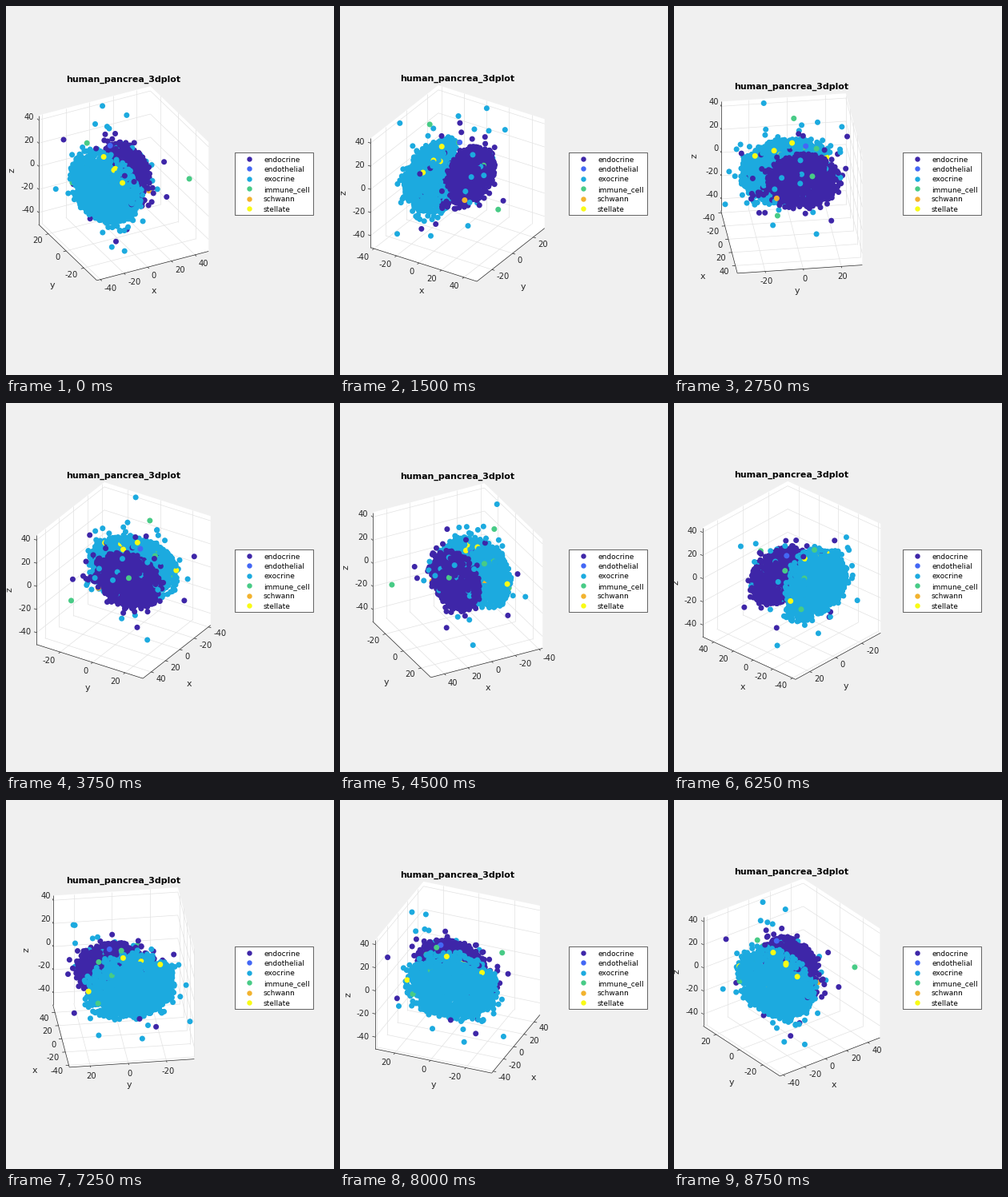
Write a matplotlib script that moves like this. It is 410 px wide and 461 px high and loops after 9000 ms.

```python
import numpy as np
import matplotlib.pyplot as plt
from matplotlib.animation import FuncAnimation
from matplotlib.collections import LineCollection
from matplotlib.colors import to_rgba

W, H, DPI = 410, 461, 100
STEPS, STEP_MS = 36, 250
PX = 72 / DPI                       # points per pixel
CX, CY, R = 147, 221.5, 78.75       # box centre and half edge in pixels
SIN_EL, COS_EL = 0.5, np.sqrt(0.75)
INK = "#262626"

KINDS = [("endocrine", "#3e26a8"), ("endothelial", "#4367f5"),
         ("exocrine", "#1caadf"), ("immune_cell", "#48cb86"),
         ("schwann", "#f2b22e"), ("stellate", "#f9fb15")]
LIMITS = [(-43, 51.5), (-34.6, 31), (-50.3, 44.1)]
TICKS = [range(-40, 41, 20), range(-20, 21, 20), range(-40, 41, 20)]

# Isolated cells, in box pixels from the centre.
STRAYS = {
    0: [(-45, 76, 36), (-17, -61, 38), (39, 45, -35), (-30, -37, -57),
        (-12, -32, -47), (-4, 15, 65), (-32, 13, 52), (56, -2, 17),
        (-36, 67, -26), (32, -55, 0), (-18, -56, 3), (-54, -13, -30)],
    1: [(-9, 19, 47)],
    2: [(3, 63, 78.5), (34, 57, 60), (-69, -26, 78), (-50, -26, 51),
        (-21.5, 35.6, 73), (8, 60, 49), (0, 39, 59), (-48, 19, 55),
        (-39.5, -78.5, -47), (-27, -20, -74.5), (-5, 32, -78.5),
        (-69, 51, -16)],
    3: [(78, -28, 0), (-47, 9, 66), (24, 23, 22), (-20, 34, 36),
        (-40, 20, 27), (-52, 39, -5)],
    4: [(24.5, -22, -6), (-34, 9, -7)],
    5: [(-26, 4, 43), (-23.5, -19, 35), (-24, -43, 29), (-18, -12, 32),
        (-44, 50, 8.5)],
}

rng = np.random.default_rng(7)


def blob(n, center, half, halo=0.1):
    """Filled ellipsoid with a thin halo of scattered points."""
    v = rng.normal(size=(n, 3))
    v /= np.linalg.norm(v, axis=1)[:, None]
    r = np.cbrt(rng.random(n))
    r *= np.where(rng.random(n) < halo, rng.uniform(1, 1.35, n), 1)
    return np.array(center) + v * r[:, None] * np.array(half)


def seam(pts):
    """Signed distance from the slanted border between both big clusters."""
    return pts[:, 0] + 14 + 0.4 * pts[:, 1] + rng.normal(0, 3.5, len(pts))


def make_cells():
    endo = np.vstack([blob(950, (10, 14, 9), (24, 46, 37)),
                      blob(130, (8, 0, 5), (24, 62, 36))])
    endo = np.vstack([endo[seam(endo) > 0],
                      blob(8, (-25, 0, 4), (38, 60, 42))])
    exo = blob(1900, (-25, 0, 3), (39, 64, 43))
    exo = np.vstack([exo[seam(exo) < 0],
                     blob(24, (10, 10, 9), (26, 52, 40), 0.3)])
    groups = {0: endo, 2: exo}
    pts, kind = [], []
    for k in range(len(KINDS)):
        g = np.array(STRAYS[k], float)
        if k in groups:
            g = np.vstack([groups[k], g])
        pts.append(g)
        kind += [k] * len(g)
    return np.vstack(pts), np.array(kind)


cells, kind = make_cells()
cell_rgba = np.array([to_rgba(c) for _, c in KINDS])[kind]
rare = np.where((kind == 0) | (kind == 2), 0, 10)


def turn(pts, c, s):
    """Rotate and flatten box vectors to screen vectors (y down)."""
    p = np.asarray(pts, float)
    x, y, z = p[..., 0], p[..., 1], p[..., 2]
    return np.stack([x * c + y * s,
                     (x * s - y * c) * SIN_EL - z * COS_EL], -1)


def place(pts, c, s):
    return turn(pts, c, s) + (CX, CY)


def scaled(axis):
    lo, hi = LIMITS[axis]
    return [((t - lo) / (hi - lo) * 2 - 1) * R for t in TICKS[axis]]


# The small margin keeps rounding from losing a pixel.
fig = plt.figure(figsize=((W + 0.01) / DPI, (H + 0.01) / DPI), dpi=DPI,
                 facecolor="#f0f0f0")
ax = fig.add_axes([0, 0, 1, 1])
ax.set_xlim(0, W)
ax.set_ylim(H, 0)
ax.axis("off")


def label(x, y, s, px, **kw):
    opts = dict(ha="center", va="center_baseline", color=INK, zorder=6)
    opts.update(kw)
    return ax.text(x, y, s, fontsize=px * PX, family="DejaVu Sans", **opts)


walls = plt.Polygon([(0, 0)] * 3, fc="white", ec="none", zorder=1)
ax.add_patch(walls)
grid = LineCollection([], colors="#e2e2e2", linewidths=0.5, zorder=2)
rules = LineCollection([], colors=INK, linewidths=0.5, zorder=3)
ax.add_collection(grid)
ax.add_collection(rules)
dots = ax.scatter(cells[:, 0], cells[:, 1], s=(7 * PX) ** 2, lw=0, zorder=4)

title = label(CX, 0, "human_pancrea_3dplot", 11, weight="bold", color="black")
tick_text = [[label(0, 0, str(t), 10) for t in ts] for ts in TICKS]
names = [label(0, 0, "x", 11), label(0, 0, "y", 11),
         label(0, 0, "z", 11, rotation=90, va="center")]

ax.add_patch(plt.Rectangle((285.5, 183.5), 98, 78, fc="white", ec=INK,
                           lw=0.5, zorder=5))
for i, (name, color) in enumerate(KINDS):
    y = 191 + 12.4 * i
    ax.scatter([304], [y], s=(6.4 * PX) ** 2, c=color, lw=0, zorder=6)
    label(322, y, name, 9, ha="left", color="black")


def update(i):
    az = np.radians(-27.5 + 10 * i)
    c, s = np.cos(az), np.sin(az)
    sc, ss = np.sign(c), np.sign(s)
    fx, fy = ss * R, -sc * R            # front corner
    lx, ly = -sc * R, -ss * R           # left corner

    outline = place([(fx, fy, -R), (-lx, -ly, -R), (-lx, -ly, R),
                     (-fx, -fy, R), (lx, ly, R), (lx, ly, -R)], c, s)
    walls.set_xy(outline)
    title.set_y(outline[:, 1].min() - 9)

    xs, ys, zs = scaled(0), scaled(1), scaled(2)
    lines = []
    for x in xs:
        lines += [[(x, -R, -R), (x, R, -R)], [(x, -fy, -R), (x, -fy, R)]]
    for y in ys:
        lines += [[(-R, y, -R), (R, y, -R)], [(-fx, y, -R), (-fx, y, R)]]
    for z in zs:
        lines += [[(-R, -fy, z), (R, -fy, z)], [(-fx, -R, z), (-fx, R, z)]]
    grid.set_segments(list(place(lines, c, s)))

    edges = [[(-R, fy, -R), (R, fy, -R)], [(fx, -R, -R), (fx, R, -R)],
             [(lx, ly, -R), (lx, ly, R)]]
    segs = list(place(edges, c, s))
    out = [(0, -sc, 0), (ss, 0, 0),
           ((lx - fx) / (2 * R), (ly - fy) / (2 * R), 0)]
    spots = [[(x, fy, -R) for x in xs], [(fx, y, -R) for y in ys],
             [(lx, ly, z) for z in zs]]
    for a in range(3):
        d = turn(out[a], c, s)
        u = d / np.hypot(*d)
        if a == 2 or u[0] < -0.6:
            ha, nudge = "right", -1
        elif u[0] > 0.6:
            ha, nudge = "left", 0
        else:
            ha, nudge = "center", 0
        drop = 0 if a == 2 else 5.8
        for text, p in zip(tick_text[a], place(spots[a], c, s)):
            segs.append(np.array([p, p + 3.9 * d]))
            text.set_position(p + 6.3 * u + (nudge, drop))
            text.set_ha(ha)
        mid = segs[a].mean(axis=0)
        if a == 2:
            names[a].set_position(mid + (-33.5, 0))
        else:
            flat = abs((c, s)[a])
            names[a].set_position(mid + (np.sign(d[0]) * (38.5 - 42 * flat),
                                         42 - 16 * flat ** 3))
    rules.set_segments(segs)

    depth = (cells[:, 0] * s - cells[:, 1] * c) * COS_EL + cells[:, 2] * SIN_EL
    order = np.argsort(depth + rare)
    dots.set_offsets(place(cells[order], c, s))
    dots.set_facecolors(cell_rgba[order])
    return []


anim = FuncAnimation(fig, update, frames=STEPS, interval=STEP_MS,
                     init_func=lambda: update(0), repeat=True, repeat_delay=0)
plt.show()
```
